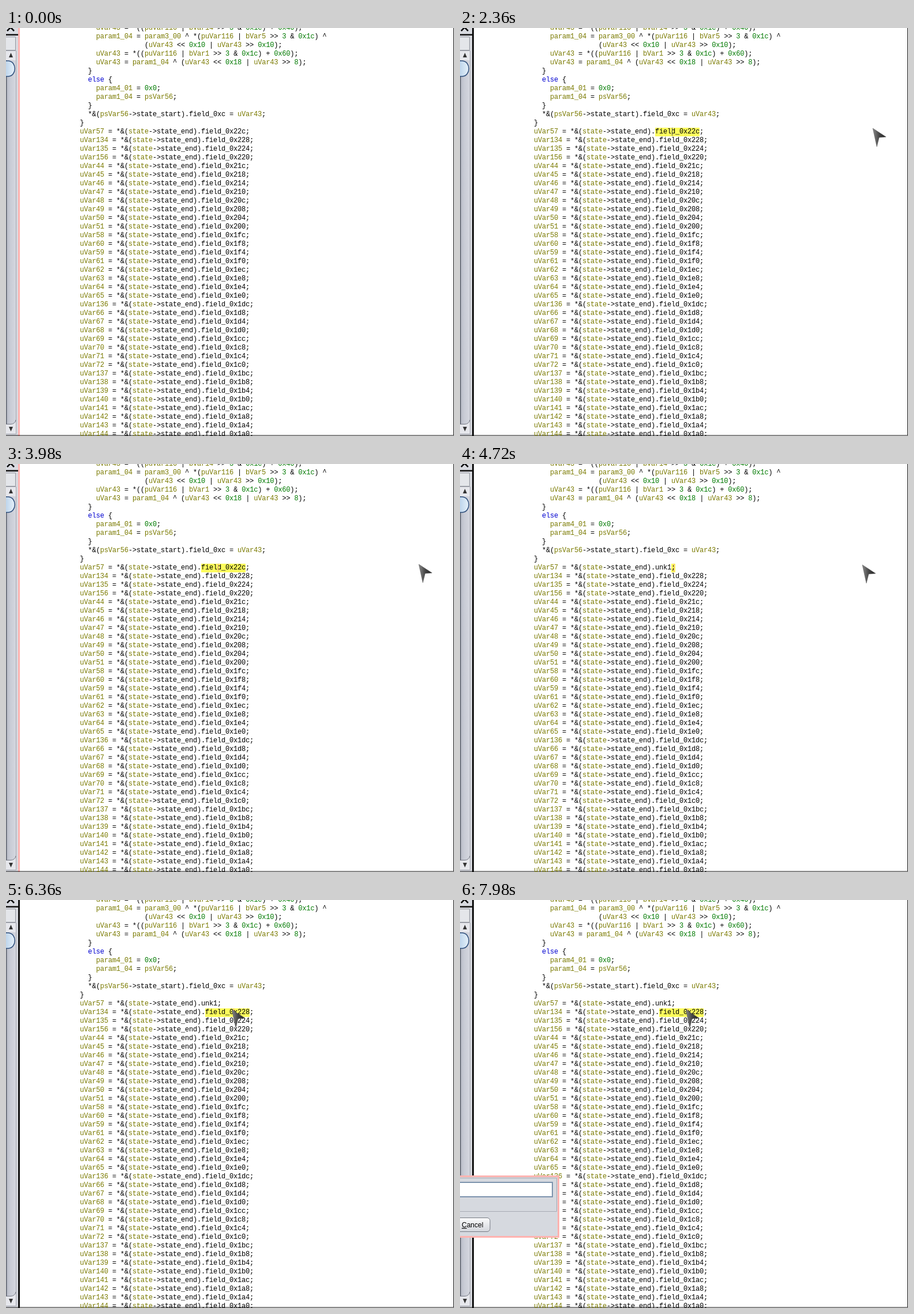
Animation of 776x708 px, one loop 8000 ms. Source, as an HTML page:

```html
<!DOCTYPE html>
<html lang="en">
<head>
<meta charset="utf-8">
<style>
  html, body { margin: 0; width: 100%; height: 100%; overflow: hidden; background: #fff; }
  #stage { position: relative; width: 776px; height: 708px; overflow: clip; }
  svg, pre, #mark, #caret { position: absolute; left: 0; top: 0; }
  pre { left: 128px; top: -7px; height: 715px; margin: 0; overflow: hidden; color: #000;
    font: 12px/15px "Liberation Mono", monospace; letter-spacing: -.2px; }
  .name { color: #7a7a00; }
  .num { color: #007a00; }
  .key { color: #0000d0; }
  #mark { height: 15px; background: #fdfd5c; }
  #caret { width: 1px; height: 14px; }
</style>
</head>
<body>
<div id="stage">
<svg width="776" height="708">
  <defs>
    <linearGradient id="track"><stop stop-color="#b4b8c3"/><stop offset=".4" stop-color="#c8cbd5"/><stop offset="1" stop-color="#d5d7df"/></linearGradient>
    <linearGradient id="thumb"><stop stop-color="#b9d2ea"/><stop offset="1" stop-color="#e6f1fa"/></linearGradient>
    <linearGradient id="button" x2="0" y2="1"><stop stop-color="#fbfbfc"/><stop offset="1" stop-color="#d3d6dc"/></linearGradient>
    <linearGradient id="arrow" x2="1" y2="0"><stop stop-color="#888"/><stop offset=".5" stop-color="#444"/><stop offset="1" stop-color="#222"/></linearGradient>
  </defs>
  <path fill="#d8dae0" d="M0 0H21V708H0Z"/>
  <path stroke="#000" stroke-width="2.5" d="M2-7 14 5M14-7 2 5"/>
  <path fill="#111" d="M0 10.5H21V13H0Z"/>
  <path fill="#e4e6ea" stroke="#92959e" d="M-1 15.5H16.5V38.5H-1Z"/>
  <path fill="#e6e7ec" stroke="#a2a5ae" d="M-1 39.5H17.5V704.5H-1Z"/>
  <path fill="url(#track)" d="M0 56H17V679Q17 687 9 687H0Z"/>
  <path fill="none" stroke="#777b86" d="M0 687.5H8Q16 687 17 680"/>
  <path fill="#5f6470" d="M0 56H1.5V687H0Z"/>
  <path fill="#333" d="M5 51 8.5 43 12 51ZM5 692H12L8.5 700Z"/>
  <path fill="url(#thumb)" stroke="#2f4f7c" stroke-width="1.5" d="M-2 57H4C19 58 19 83 4 84H-2Z"/>
  <path id="frame" stroke-width="3" d="M22.5 0V708"/>
  <path fill="none" stroke="#111" d="M0 707H775.5V0"/>
</svg>
<div id="mark"></div>
<pre id="code"></pre>
<div id="caret"></div>
<svg width="776" height="708">
  <g id="dialog">
    <path fill="#d6d9df" stroke="#ffb3b0" stroke-width="3" d="M-5 479.5H170.5V584.5H-5Z"/>
    <path fill="none" stroke="#a7abb4" d="M0 482.5H167.5V540.5H0"/>
    <path fill="#fff" stroke="#7d93ad" stroke-width="2" d="M-5 490H160V515H-5Z"/>
    <rect x="-20" y="551.5" width="72" height="24" rx="5" fill="url(#button)" stroke="#777b84"/>
    <text x="3" y="568" font-family="Liberation Sans, sans-serif" font-size="12"><tspan text-decoration="underline">C</tspan>ancel</text>
  </g>
  <path id="pointer" fill="url(#arrow)" stroke="#4446" d="M0 0 23 15 11 16 7 32Z"/>
</svg>
</div>
<script>
const $ = id => document.getElementById(id);
const range = (from, to) => Array.from({ length: to - from + 1 }, (_, i) => from + i);

const head = `    uVar43 = *((puVar116 | bVar14 >> 3 & 0x1c) + 0x40);
    param1_04 = param3_00 ^ *(puVar116 | bVar5 >> 3 & 0x1c) ^
                (uVar43 << 0x10 | uVar43 >> 0x10);
    uVar43 = *((puVar116 | bVar1 >> 3 & 0x1c) + 0x60);
    uVar43 = param1_04 ^ (uVar43 << 0x18 | uVar43 >> 8);
  }
  else {
    param4_01 = 0x0;
    param1_04 = psVar56;
  }
  *&(psVar56->state_start).field_0xc = uVar43;
}
`;
const ids = [57, 134, 135, 156, ...range(44, 51), 58, 60, 59, ...range(61, 65),
  136, ...range(66, 72), ...range(137, 144)];
const loads = ids.map((id, i) =>
  `uVar${id} = *&(state->state_end).field_0x${(0x22c - 4 * i).toString(16)};`).join("\n");

const escapes = { "&": "&amp;", "<": "&lt;", ">": "&gt;" };
const tokens = /(\b(?:\w*Var|param)\d\w*|\bstate\b)|(\b(?:0x\w+|\d)\b)|(\belse\b)|(field_0x22c)|([&<>])/g;
$("code").innerHTML = (head + loads).replace(tokens, (s, name, num, key, field) =>
  name ? `<span class="name">${s}</span>` :
  num ? `<span class="num">${s}</span>` :
  key ? `<span class="key">${s}</span>` :
  field ? `<span id="field">${s}</span>` : escapes[s]);

// Pointer stops: time, x, y
const stops = [[740, -30, 640], [840, 150, 440], [920, 362, 180], [1180, 362, 180], [1480, 715, 174],
  [4640, 715, 174], [5200, 396, 190], [5400, 396, 190], [5560, 391, 190]];

function pointerAt(t) {
  const next = stops.findIndex(s => s[0] > t);
  if (next <= 0) return stops.at(next).slice(1);
  const [t0, x0, y0] = stops[next - 1], [t1, x1, y1] = stops[next];
  const u = (t - t0) / (t1 - t0), k = t0 < 920 ? u : u * u * (3 - 2 * u);
  return [x0 + (x1 - x0) * k, y0 + (y1 - y0) * k];
}

const within = (t, from, to) => t >= from && t < to;
const show = (el, on) => el.style.visibility = on ? "visible" : "hidden";

function place(el, x, y, width) {
  Object.assign(el.style, { left: x + "px", top: y + "px", width: width + "px" });
}

function draw(t) {
  const renamed = t >= 4560, second = t >= 5800;
  const focusLeft = t < 780 || within(t, 3780, 4560);
  $("frame").setAttribute("stroke", focusLeft ? "#ffb3b0" : "#111");
  $("field").textContent = renamed ? "unk1" : "field_0x22c";

  show($("mark"), t >= 1160);
  if (second) place($("mark"), 345, 188, 77);
  else if (renamed) place($("mark"), 366, 173, 7);
  else place($("mark"), 338, 173, 77);

  show($("caret"), t >= 1160);
  place($("caret"), second ? 394 : renamed ? 370 : 367, second ? 188 : 173, 1);
  $("caret").style.background = focusLeft || renamed ? "#f0a080" : "#555";

  show($("dialog"), within(t, 2440, 3780) || t >= 7320);
  const [x, y] = pointerAt(t);
  show($("pointer"), t >= 740);
  $("pointer").setAttribute("transform", `translate(${x} ${y})`);
}

function tick() {
  draw(performance.now() % 8000);
  requestAnimationFrame(tick);
}
tick();
</script>
</body>
</html>
```
